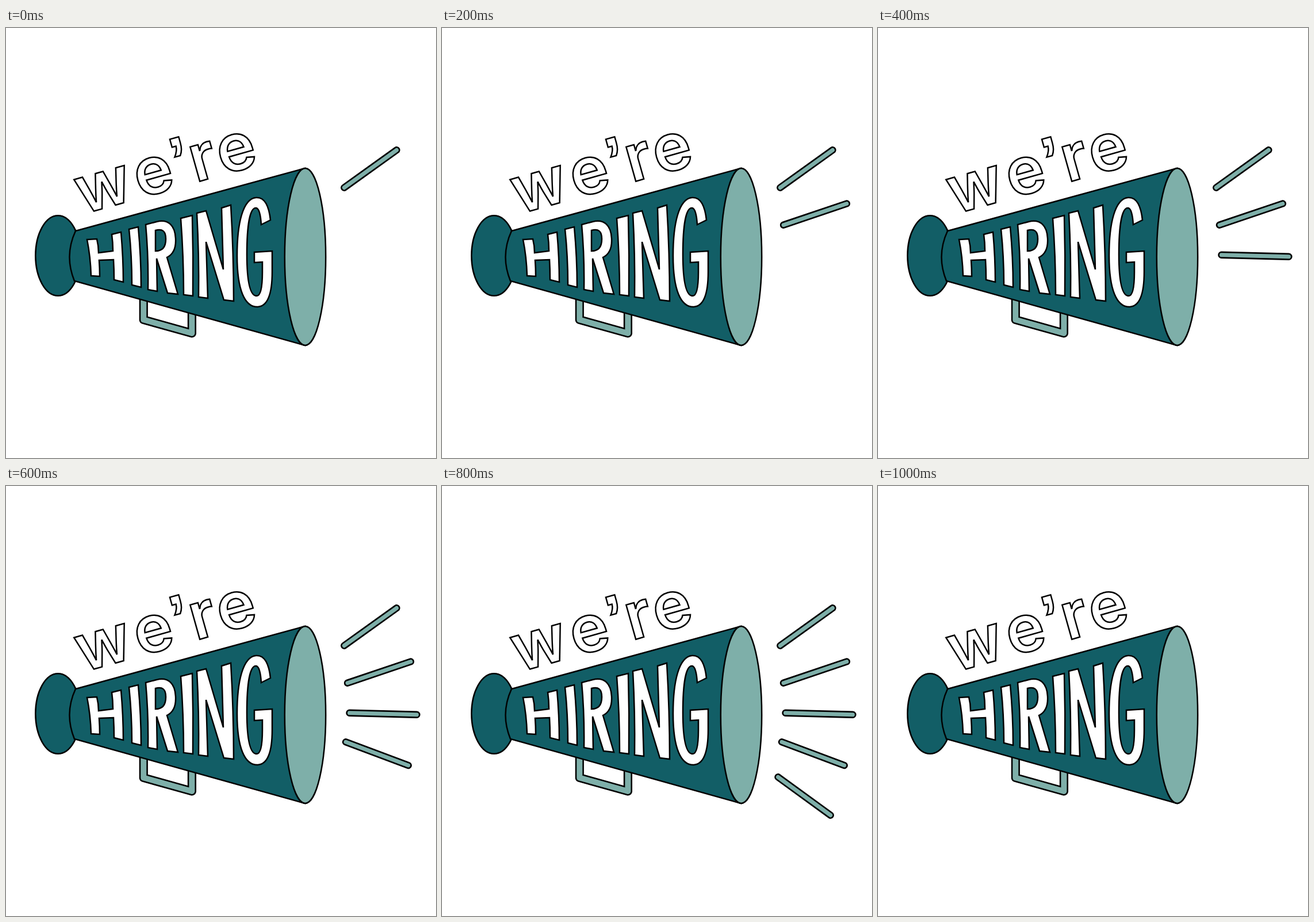
An HTML page for the animation above (1.2 s loop, 748x748 px).

```html
<!DOCTYPE html>
<html lang="en">
<head>
<meta charset="utf-8">
<title>We're hiring</title>
<style>
  html, body { margin: 0; width: 100%; height: 100%; overflow: hidden; background: #fff; }
  svg { display: block; width: 100%; height: 100%; }
  .ink { stroke: #000; stroke-width: 2.5; }
  .dark { fill: #125e66; }
  .light { fill: #7eafa9; }
  .word { fill: #fff; font: 600 114px Inter, Roboto, sans-serif; text-anchor: middle; }
  .mark { font: 700 114px "Liberation Sans", Arial, sans-serif; }
  .tube { fill: none; stroke-linecap: round; stroke-linejoin: round; }
</style>
</head>
<body>
<svg viewBox="0 0 748 748" role="img" aria-label="we’re HIRING">
  <g id="handle"></g>
  <ellipse class="ink dark" cx="90.5" cy="396" rx="39.2" ry="69.7"/>
  <path class="ink dark" d="M121 353L520 244V552L119 440Q101 396 121 353Z"/>
  <ellipse class="ink light" cx="520.5" cy="398" rx="35.7" ry="154"/>

  <text class="ink word" transform="translate(257 257) rotate(-15.7)" y="31"><tspan x="-90 0">we</tspan><tspan class="mark" x="52" y="25">’</tspan><tspan x="89.5 149.5" y="31">re</tspan></text>

  <g class="ink" fill="#fff" fill-rule="evenodd">
    <path d="M141 368L158 367Q161 379 161 391L186 388Q186 373 184 359L200 355Q204 400 204 442L188 438Q188 420 187 403L162 404Q163 418 163 432L148 431Q147 398 141 368Z"/>
    <path d="M214 350L230 346Q235 400 235 451L219 447Q219 398 214 350Z"/>
    <path d="M243 342L262 337C283 332 294 344 295 366C296 383 290 394 280 399L299 463L281 461L262 401L263 458L247 455Q248 398 243 342ZM260 352V388C273 388 278 380 278 367C278 353 272 349 260 352Z"/>
    <path d="M304 331L324 326Q326 396 325 466L309 464Q309 398 304 331Z"/>
    <path d="M332 322L348 318L378 420L375 313L391 308Q396 392 396 475L379 473L348 372L351 470L335 468Q336 395 332 322Z"/>
    <path d="M444 342L460 334C457 306 448 294 435 295C412 297 402 340 402 396C402 455 415 486 438 485C455 484 463 462 463 424V388L432 390V408L446 407V425C446 450 443 466 436 466C424 466 419 440 419 394C419 345 424 314 434 313C440 312 443 325 444 342Z"/>
  </g>
  <g id="rays"></g>
</svg>
<script>
  const STEP = 200, STEPS = 6;

  // A light line with a black border
  function tube(parent, d, width, border) {
    const g = document.createElementNS("http://www.w3.org/2000/svg", "g");
    g.innerHTML = `<path class="tube" d="${d}" stroke="#000" stroke-width="${width}"/>
      <path class="tube" d="${d}" stroke="#7eafa9" stroke-width="${width - 2 * border}"/>`;
    document.getElementById(parent).append(g);
    return g;
  }

  tube("handle", "M239.3 468V507.5L323.4 531V488", 15.2, 2.6);

  const rays = [
    "M588.3 277.7L679.5 212.3",
    "M594 342.7L704 305.5",
    "M597.5 394.8L714.5 397.8",
    "M591 445.3L699.8 486",
    "M584.5 506.3L675.8 572.7"
  ].map(d => tube("rays", d, 12.4, 2.7));

  function draw() {
    const step = Math.floor(performance.now() / STEP) % STEPS;
    rays.forEach((ray, i) => {
      ray.style.display = i <= step && step < STEPS - 1 ? "" : "none";
    });
    requestAnimationFrame(draw);
  }
  draw();
</script>
</body>
</html>
```
